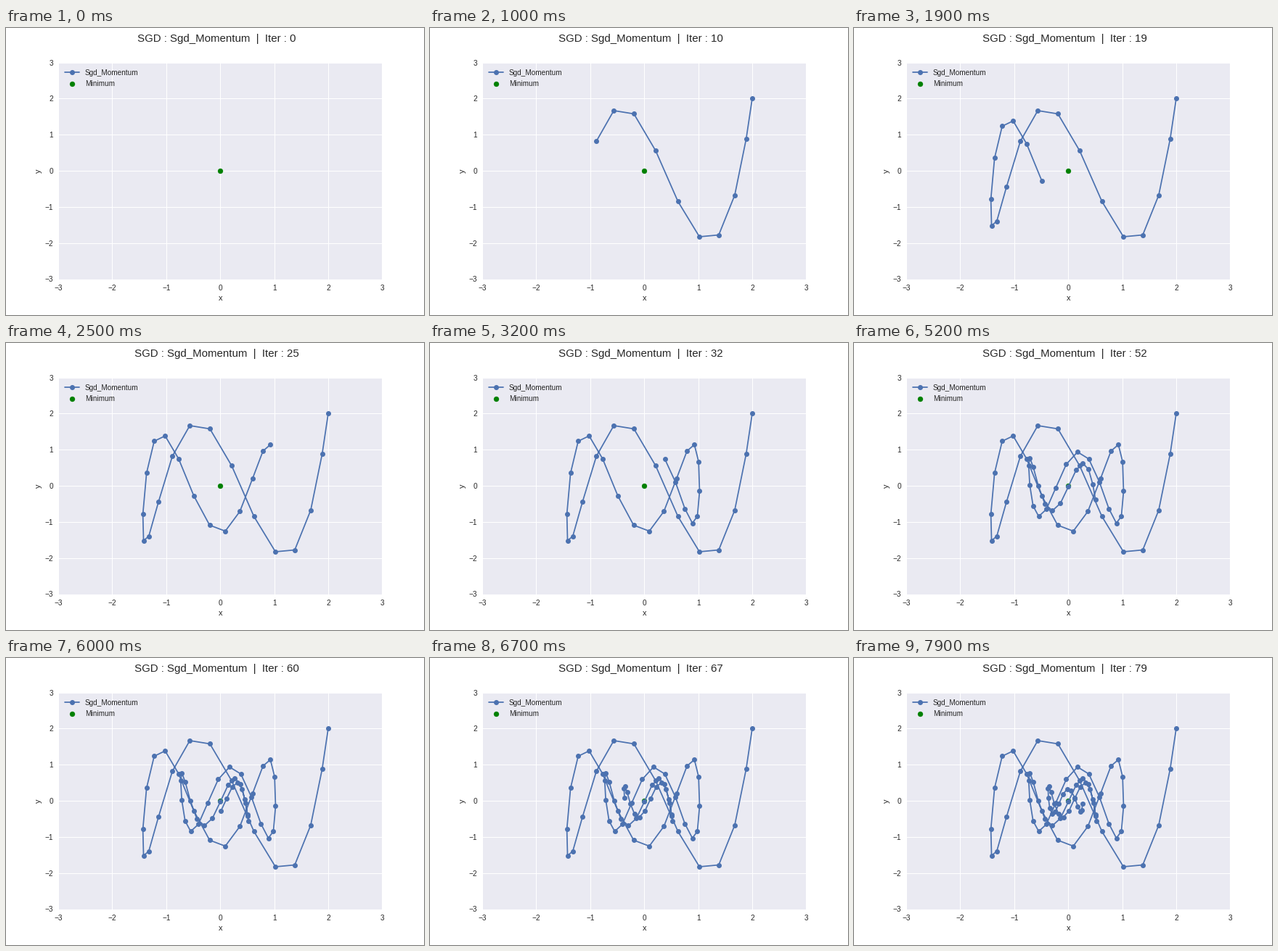
A matplotlib script that plays this animation: 576x396 px, repeating every 8 s.

```python
import matplotlib.pyplot as plt
from matplotlib.animation import FuncAnimation

plt.style.use("seaborn-v0_8")
plt.rcParams.update({
    "font.family": "Liberation Sans",
    "figure.subplot.bottom": 0.125,
    "figure.subplot.top": 0.88,
    "figure.subplot.left": 0.125,
    "figure.subplot.right": 0.9,
})

FRAMES = 80
STEP_MS = 100
MOMENTUM = 0.95
RATE = 0.056


def gradient(x, y):
    """Gradient of the bowl x^2 / 2 + 5 y^2."""
    return x, 10 * y


def descend(x, y, steps):
    """Heavy-ball descent; returns the visited points."""
    xs, ys = [x], [y]
    vx = vy = 0.0
    for _ in range(steps):
        gx, gy = gradient(x, y)
        vx = MOMENTUM * vx - RATE * gx
        vy = MOMENTUM * vy - RATE * gy
        x, y = x + vx, y + vy
        xs.append(x)
        ys.append(y)
    return xs, ys


xs, ys = descend(2.0, 2.0, FRAMES)

fig, ax = plt.subplots(figsize=(8, 5.5), dpi=72)
title = fig.suptitle("", fontsize=15)
path, = ax.plot([], [], "o-", color="#4C72B0", label="Sgd_Momentum")
ax.scatter([0], [0], color="green", label="Minimum")
ax.set(xlim=(-3, 3), ylim=(-3, 3), xlabel="x", ylabel="y",
       xticks=range(-3, 4), yticks=range(-3, 4))
ax.legend(loc="upper left")


def update(i):
    path.set_data(xs[:i], ys[:i])
    title.set_text(f" SGD : Sgd_Momentum  |  Iter : {i}")
    return path, title


anim = FuncAnimation(fig, update, frames=FRAMES, interval=STEP_MS,
                     repeat=True, repeat_delay=0, blit=False)
plt.show()
```
